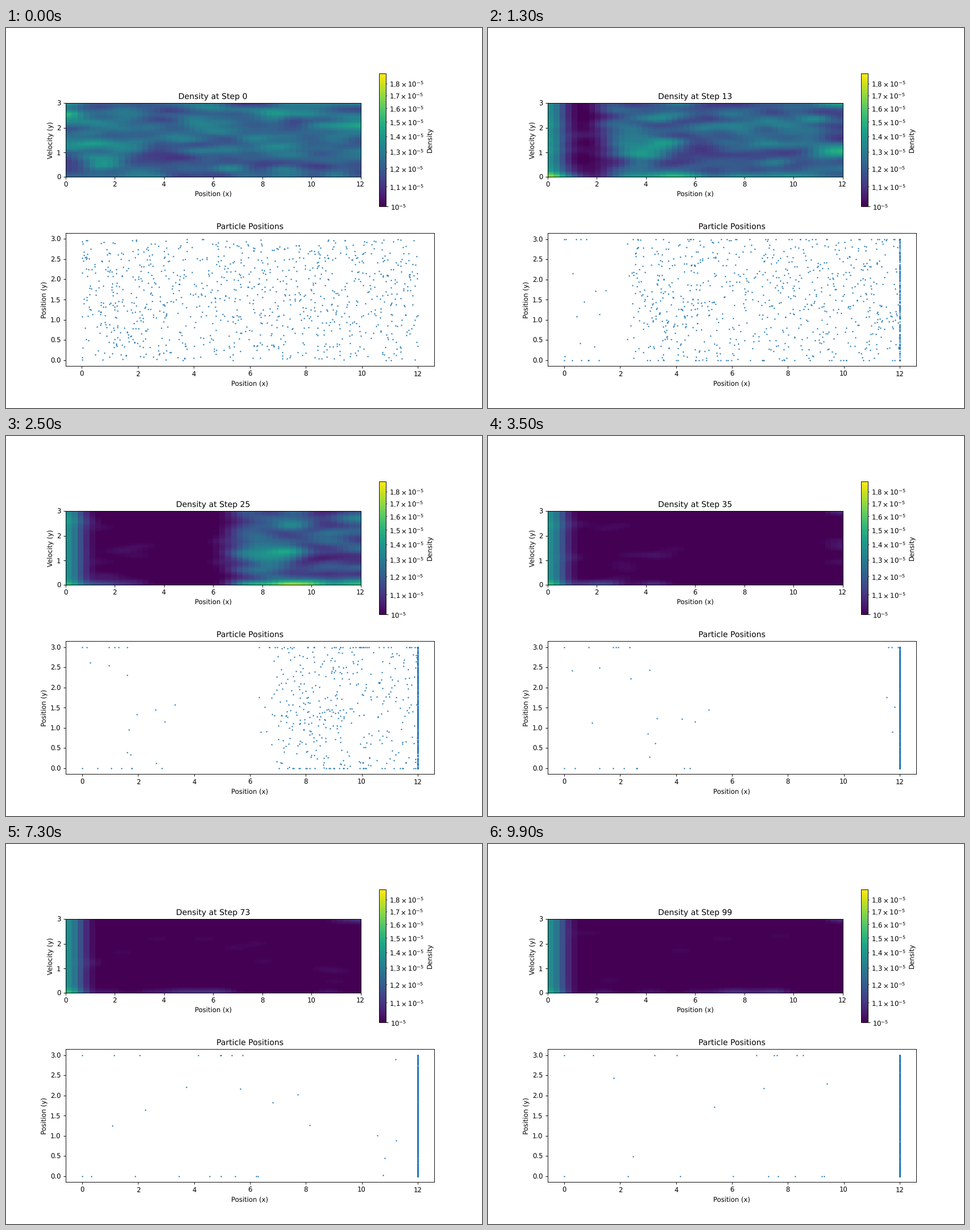
A matplotlib script that plays this animation: 837 px wide and 669 px high, repeating every 10000 ms.

```python
import numpy as np
import matplotlib.pyplot as plt
from matplotlib.animation import FuncAnimation
from matplotlib.colors import LogNorm

plt.rcParams["text.hinting"] = "none"

STEPS, N, COUNT = 100, 50, 980
W, H = 12.0, 3.0
SIGMA, BASE, GAIN, INLET = 2.0, 0.986, 0.66, 1.5
WALL, INNER = 16, 20

# Main uneven spots of the starting cloud: x, y, strength
SPOTS = [(4.6, 0.8, -0.7), (9.2, 1.7, -0.4), (1.9, 0.4, 0.7), (10.9, 2.1, 0.6)]

rng = np.random.default_rng(7)


def mirror(v, top):
    """Fold values that left 0..top back inside."""
    return top - np.abs(top - np.abs(v))


def start_cloud():
    """Evenly spread points with jitter, thinned by the spots."""
    i = np.arange(4 * COUNT)
    x = mirror(i * 0.7548776662 % 1 * W + rng.normal(0, 0.25, i.size), W)
    y = mirror(i * 0.5698402910 % 1 * H + rng.normal(0, 0.08, i.size), H)
    weight = np.ones(i.size)
    for cx, cy, a in SPOTS:
        weight += a * np.exp(-((x - cx) / 0.8) ** 2 - ((y - cy) / 0.25) ** 2)
    keep = np.flatnonzero(rng.random(i.size) * 2 < weight)[:COUNT]
    return np.clip(x[keep], 0.02, 11.99), np.clip(y[keep], 0.005, 2.99)


X0, Y0 = start_cloud()
SPEED = rng.normal(1, 0.05, COUNT)
RISE = rng.normal(0, 0.025, COUNT)
PHASE = rng.uniform(0, 2 * np.pi, COUNT)


def cloud(t):
    x = X0 + SPEED * t * (0.105 + 0.0053 * t + 0.000055 * t * t)
    y = Y0 + RISE * min(t, 24)
    y = y + np.where(x >= W, 0.05 * np.sin(0.3 * t + PHASE), 0)
    return np.column_stack([np.clip(x, 0, W), np.clip(y, 0, H)])


# Particles entering at x = 0, fewer and fewer: slow along the walls, faster inside
BIRTH = np.concatenate([95 * (np.arange(n) / n) ** 2.5 for n in (WALL, INNER)])
DRIFT = np.concatenate([rng.uniform(0.045, 0.07, WALL),
                        rng.uniform(0.05, 0.12, INNER)])
BOOST = np.repeat([0.0003, 0.0015], [WALL, INNER])
ENTRY = np.concatenate([H * (np.arange(WALL) % 2), rng.uniform(0, H, INNER)])
SLOPE = np.concatenate([np.zeros(WALL), rng.normal(0, 0.015, INNER)])


def inflow(t):
    age = t - BIRTH
    x = DRIFT * age + BOOST * age ** 2
    y = ENTRY + SLOPE * age
    pts = np.column_stack([np.clip(x, 0, W), np.clip(y, 0, H)])[age > 0]
    corners = [[0, 0], [0, H]] if t else np.empty((0, 2))
    return np.vstack([pts, corners])


def smoother():
    """Gaussian smoothing matrix with mirrored edges."""
    i, j = np.mgrid[:N, :N]

    def bell(d):
        return np.exp(-d ** 2 / (2 * SIGMA ** 2))

    k = bell(i - j) + bell(i + j + 1) + bell(i + j + 1 - 2 * N)
    return k / (np.sqrt(2 * np.pi) * SIGMA)


K = smoother()


def density(t, pts):
    x, y = pts[(pts[:, 0] < W) & (pts[:, 1] < H)].T
    grid, _, _ = np.histogram2d(y, x, bins=N, range=[[0, H], [0, W]])
    grid[:, 0] += INLET * (1 - np.exp(-t / 3))
    grid[-1, -1] += 1
    return 1e-5 * np.maximum(1, BASE + GAIN * (K @ grid @ K.T))


fig, (ax1, ax2) = plt.subplots(2, 1, figsize=(10, 7.993), dpi=83.7)
im = ax1.imshow(np.full((N, N), 1e-5), origin="lower", extent=[0, W, 0, H],
                cmap="viridis", norm=LogNorm(1e-5, 1.889e-5),
                interpolation="nearest")
fig.colorbar(im, ax=ax1, label="Density")
ax1.set(xlabel="Position (x)", ylabel="Velocity (y)")
dots = ax2.scatter(X0, Y0, s=1)
ax2.set(title="Particle Positions", xlabel="Position (x)",
        ylabel="Position (y)")


def padded(v):
    pad = 0.05 * np.ptp(v)
    return v.min() - pad, v.max() + pad


def update(t):
    pts = np.vstack([cloud(t), inflow(t)])
    im.set_data(density(t, pts))
    ax1.set_title(f"Density at Step {t}")
    dots.set_offsets(pts)
    ax2.set_xlim(padded(pts[:, 0]))
    ax2.set_ylim(padded(pts[:, 1]))
    return im, dots


anim = FuncAnimation(fig, update, frames=STEPS, interval=100, repeat=True)
plt.show()
```
